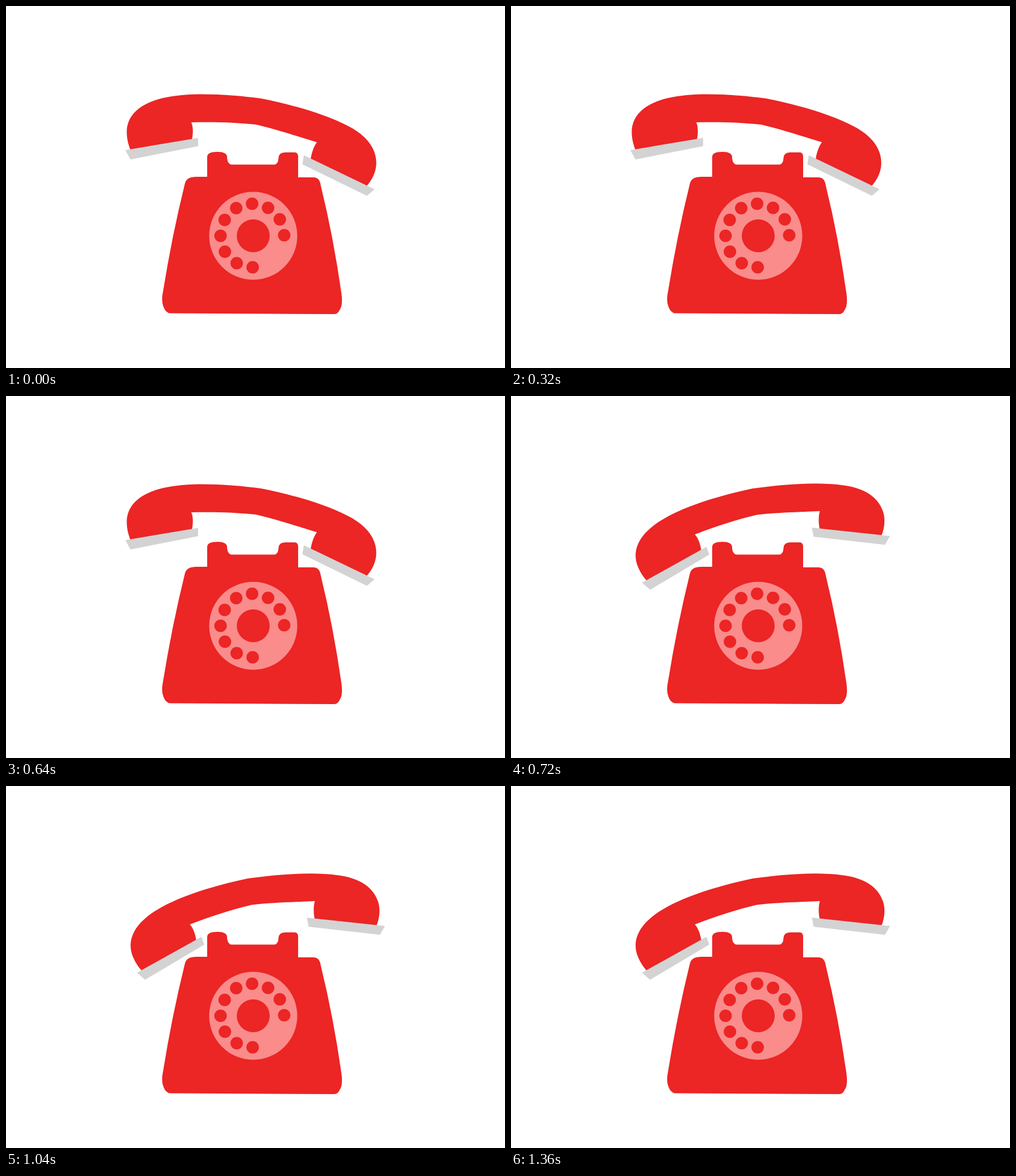
Write an HTML page that moves like this. It is 878x638 px and loops after 1400 ms.

```html
<!DOCTYPE html>
<html lang="en">
<head>
<meta charset="utf-8">
<title>Ringing telephone</title>
<style>
  html, body { margin: 0; width: 100%; height: 100%; overflow: hidden; background: #fff; }
  svg { display: block; width: 878px; height: 638px; }
  .red { fill: #ec2525; }
  .pink { fill: #fa8c8c; }
  .grey { fill: #d3d3d3; }
</style>
</head>
<body>
<svg viewBox="0 0 878 638">
  <path class="red" d="M354 301V266Q354 257 372 257T389 268Q390 279 397 279.5
    H472Q479 279 479.5 268Q480 258 491 258H508Q514 258 514 266V302
    H541Q552 302 554 317Q576 407 590 505Q593 526 588 534Q584 543 578 543
    L289 541.5Q281 541 277 530Q273 520 276 505Q292 405 315 312Q318 301 335 301Z"/>
  <circle class="pink" cx="435" cy="405" r="77.5"/>
  <circle class="red" cx="435" cy="405" r="29"/>
  <g id="holes" class="red"></g>
  <g id="handset">
    <path class="red" d="M219 254C215 243 212.5 234 212.5 222C212.5 190 240 155.5 345 155.5
      C380 155.5 420 159 449 163C500 173 560 190 600 210.5C635 228 651.5 251 651.5 277
      C651.5 291 645 306 634 318L536 270C538 258 541 249 547 240C520 232 475 217 440 209
      C405 205 365 204 326 205C330 214 329 226 327 237Z"/>
    <path class="grey" d="M210 254L338 232.5V247L219 270.5Z"/>
    <path class="grey" d="M524 263L648.5 323L635 334.5L521.5 279Z"/>
  </g>
</svg>
<script>
  const LOOP = 1400, BEAT = 80, SWING = -19.6;
  const holes = document.getElementById('holes');
  const handset = document.getElementById('handset');

  // Ten finger holes, 30 degrees apart, clockwise from the bottom of the dial.
  for (let i = 0; i < 10; i++) {
    const angle = (89.5 + 30 * i) * Math.PI / 180;
    const hole = document.createElementNS('http://www.w3.org/2000/svg', 'circle');
    hole.setAttribute('cx', 433.5 + 56 * Math.cos(angle));
    hole.setAttribute('cy', 404.5 + 56 * Math.sin(angle));
    hole.setAttribute('r', 11);
    holes.append(hole);
  }

  // The handset jumps between two poses on every beat; the loop cuts the last beat short.
  function draw(now) {
    const beat = Math.floor(now % LOOP / BEAT);
    handset.setAttribute('transform', `rotate(${beat % 2 * SWING} 437.3 231.8)`);
    requestAnimationFrame(draw);
  }
  requestAnimationFrame(draw);
</script>
</body>
</html>
```
